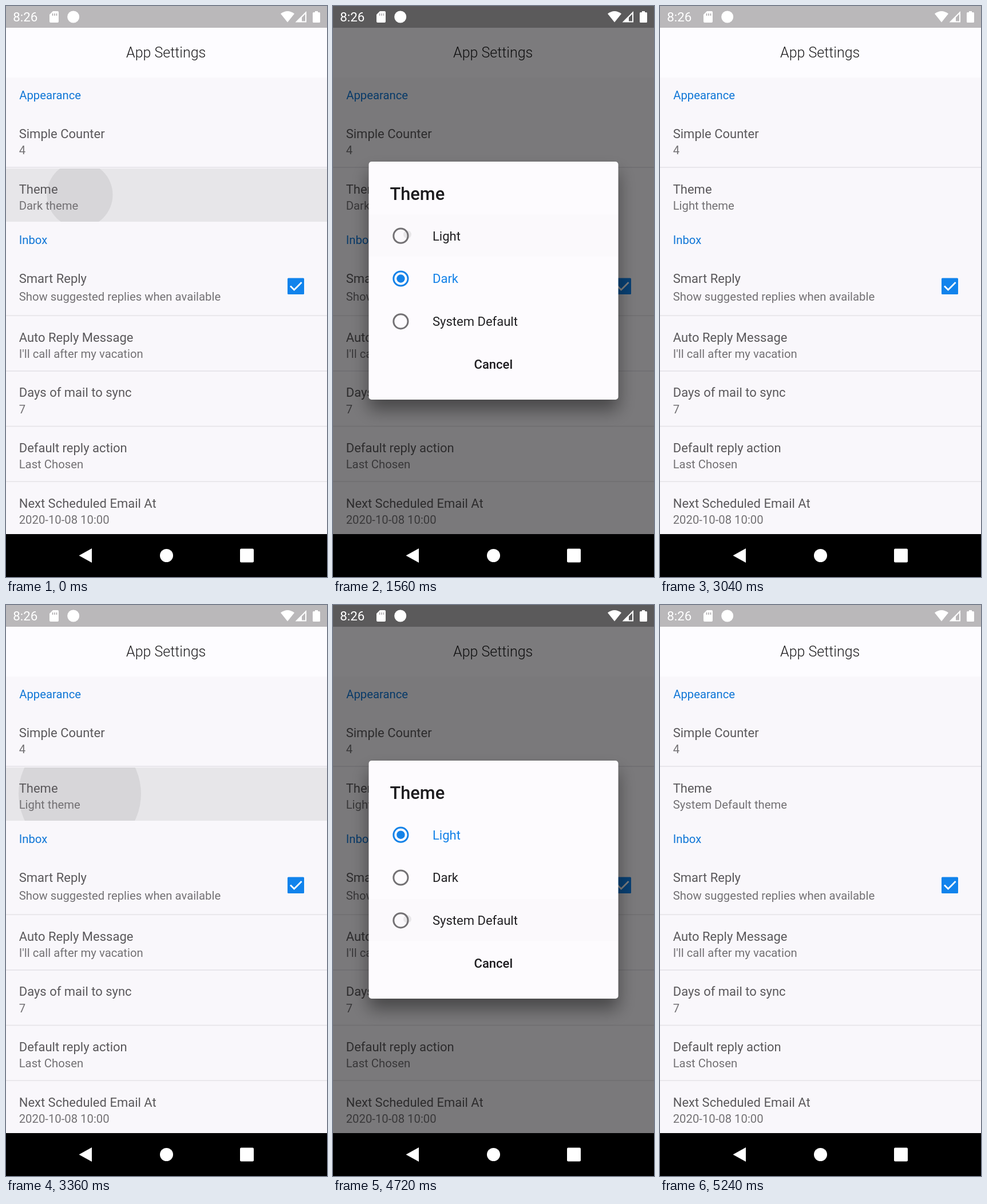
Recreate the animation shown at these times as an HTML page. Size 561 by 998 pixels, loop 5.28 s.

```html
<!DOCTYPE html>
<html lang="en">
<head>
<meta charset="utf-8">
<title>App Settings</title>
<style>
  html, body { margin: 0; width: 100%; height: 100%; overflow: hidden; background: #f9f7fb; }
  svg { display: block; width: 100vw; height: 100vh; font: 22px Roboto, "Noto Sans", sans-serif; }
  .title { fill: #5a585b; }
  .sub { font-size: 20.3px; fill: #737174; }
  .head { font-size: 20.3px; fill: #0f76d6; }
  .line { fill: #e7e5e9; }
  .option { fill: #212023; }
  .radio { fill: none; stroke: #737174; stroke-width: 3; }
  .dot { fill: none; }
  .on .option, .on .dot { fill: #1482e8; }
  .on .radio { stroke: #1482e8; }
</style>
</head>
<body>
<svg viewBox="0 0 561 998">
  <defs>
    <filter id="shadow" x="-20%" y="-20%" width="140%" height="145%">
      <feDropShadow dx="0" dy="18" stdDeviation="15" flood-color="#000" flood-opacity=".42"/>
    </filter>
    <clipPath id="themeClip"><rect y="284" width="561" height="93"/></clipPath>
    <clipPath id="optionClip"><rect id="optionClipBox" x="62" width="436.5" height="74"/></clipPath>
  </defs>

  <rect width="561" height="998" fill="#f9f7fb"/>
  <rect width="561" height="125" fill="#fdfcff"/>
  <rect width="561" height="38" fill="#bab8ba"/>
  <text x="279.7" y="90" text-anchor="middle" font-size="25" font-weight="300" fill="#1f1e20">App Settings</text>

  <g id="themeRipple" clip-path="url(#themeClip)">
    <rect y="284" width="561" height="93" fill-opacity=".07"/>
    <circle cx="129" cy="330" fill-opacity=".07"/>
  </g>
  <g id="list"></g>
  <rect x="492" y="475.5" width="29" height="28.5" rx="1.5" fill="#1183ec"/>
  <path d="M497 489.5l6.6 6.6 13-13" fill="none" stroke="#fff" stroke-width="2.8"/>

  <rect id="dim" width="561" height="923"/>

  <g fill="#fff">
    <text x="12.3" y="27.3" font-size="22.3">8:26</text>
    <path d="M82 9h8q2 0 2 2v16q0 2-2 2H78q-2 0-2-2V15z"/>
    <path d="M81.500 13v4M85 13v4M88.500 13v4" stroke="#aaa8aa" stroke-width="1.500"/>
    <circle cx="117.700" cy="19" r="10.500"/>
    <path d="M480 13.500q12-9 24 0L492 28.500z"/>
    <path fill-rule="evenodd" d="M525 9v19.500H505.500zM523 14v12.500H517V20z"/>
    <path d="M540 11V9h5v2h2.500q1.500 0 1.500 1.500v15q0 1.500-1.500 1.500h-10q-1.500 0-1.500-1.500v-15q0-1.500 1.500-1.500z"/>
  </g>

  <g id="dialog">
    <rect x="62.500" y="272" width="436" height="416" rx="5" fill="#fdfbfe" filter="url(#shadow)"/>
    <g id="optionRipple" clip-path="url(#optionClip)">
      <rect id="optionShade" x="62" width="436.500" height="74"/>
      <circle id="optionWave" cx="130" fill-opacity=".075"/>
    </g>
    <text x="99.500" y="339" font-size="30.800" font-weight="500" fill="#1d1c1f">Theme</text>
    <g id="options"></g>
    <text x="280.300" y="634" text-anchor="middle" font-weight="500" fill="#1d1c1f">Cancel</text>
  </g>

  <rect y="923" width="561" height="75"/>
  <g fill="#fff">
    <path d="M127.500 960.500L150 948v25z"/>
    <circle cx="280.500" cy="960.500" r="11.500"/>
    <rect x="409" y="948.500" width="24" height="24" rx="2"/>
  </g>
</svg>

<script>
const LOOP = 5280, STEP = 40;
const $ = id => document.getElementById(id);
const clamp = v => Math.max(0, Math.min(1, v));
const easeOut = (u, power) => 1 - (1 - clamp(u)) ** power;

const text = (cls, x, y, s, id = '') => `<text class="${cls}" x="${x}" y="${y}" id="${id}">${s}</text>`;
const row = (y, title, sub, gap = 28.2, id) =>
  text('title', 22.7, y, title) + text('sub', 22.7, y + gap, sub, id);

$('list').innerHTML =
  text('head', 23.2, 163, 'Appearance') +
  row(231, 'Simple Counter', '4') +
  row(327.7, 'Theme', '', 28.2, 'themeName') +
  text('head', 22.7, 415.6, 'Inbox') +
  row(483.6, 'Smart Reply', 'Show suggested replies when available', 31.2) +
  row(586.6, 'Auto Reply Message', "I'll call after my vacation") +
  row(683.3, 'Days of mail to sync', '7') +
  row(780, 'Default reply action', 'Last Chosen') +
  row(876.7, 'Next Scheduled Email At', '2020-10-08 10:00') +
  [282, 541.2, 638, 734.6, 831.2].map(y =>
    `<rect class="line" y="${y - 0.9}" width="561" height="1.8"/>`).join('');

const themes = ['Light', 'Dark', 'System Default'];
const optionY = i => 401.7 + 74.8 * i;
$('options').innerHTML = themes.map((name, i) => `<g>
  <circle class="radio" cx="118.400" cy="${optionY(i)}" r="12.600"/>
  <circle class="dot" cx="118.400" cy="${optionY(i)}" r="7.200"/>
  ${text('option', 174, optionY(i) + 7.8, name)}</g>`).join('');

// One entry per time the dialog is shown
const visits = [
  { open: 260, tap: 1560, close: 2048, selected: 1, picked: 0 },
  { open: 3380, tap: 4720, close: 5128, selected: 0, picked: 2 }
];

function dialogState(t, v) {
  if (t >= v.close) {
    const u = t - v.close;
    return { alpha: u > 110 ? 0 : 1 - easeOut(u / 150, 3), dim: 1 - clamp(u / 90), scale: 1 };
  }
  const u = t - v.open;
  if (u >= 140) return { alpha: 1, dim: 1, scale: 1 };
  const alpha = easeOut(u / 150, 3);
  return { alpha, dim: alpha, scale: 0.9 + 0.1 * easeOut(u / 220, 5) };
}

function drawThemeRipple(t, alpha) {
  const second = t >= 3040;
  const shown = t < 400 || (second && t < 3520);
  const radius = second ? 7 + 16.7 * (t - 3080) / STEP : 57.5 + 16.7 * t / STEP;
  const fade = second ? clamp((t - 3040) / 120) : 1;
  const ripple = $('themeRipple');
  ripple.setAttribute('opacity', shown ? fade * (1 - alpha) : 0);
  ripple.lastElementChild.setAttribute('r', Math.max(0, Math.min(107, radius)));
}

function drawOptionRipple(t, v) {
  const k = (t - v.tap) / STEP;
  const top = optionY(v.picked) - 37.4;
  $('optionRipple').setAttribute('opacity', k >= 0 ? 1 : 0);
  $('optionClipBox').setAttribute('y', top);
  $('optionShade').setAttribute('y', top);
  $('optionShade').setAttribute('fill-opacity', 0.065 * clamp(0.15 + 0.3 * k));
  $('optionWave').setAttribute('cy', top + 35);
  $('optionWave').setAttribute('r', Math.max(0, Math.min(195, 7 + 17.1 * k)));
}

function draw(time) {
  const t = Math.floor(time % LOOP / STEP) * STEP;
  const visit = visits[t < 2600 ? 0 : 1];
  const { alpha, dim, scale } = dialogState(t, visit);

  $('themeName').textContent = themes[t < 2040 ? 1 : t < 5120 ? 0 : 2] + ' theme';
  drawThemeRipple(t, alpha);
  drawOptionRipple(t, visit);

  [...$('options').children].forEach((g, i) =>
    g.setAttribute('class', i === visit.selected ? 'on' : ''));
  $('dim').setAttribute('opacity', 0.51 * dim);
  $('dialog').setAttribute('opacity', alpha);
  $('dialog').setAttribute('transform',
    `translate(280.5 480) scale(${scale}) translate(-280.5 -480)`);
}

const start = performance.now();
function tick() {
  draw(performance.now() - start);
  requestAnimationFrame(tick);
}
tick();
</script>
</body>
</html>
```
